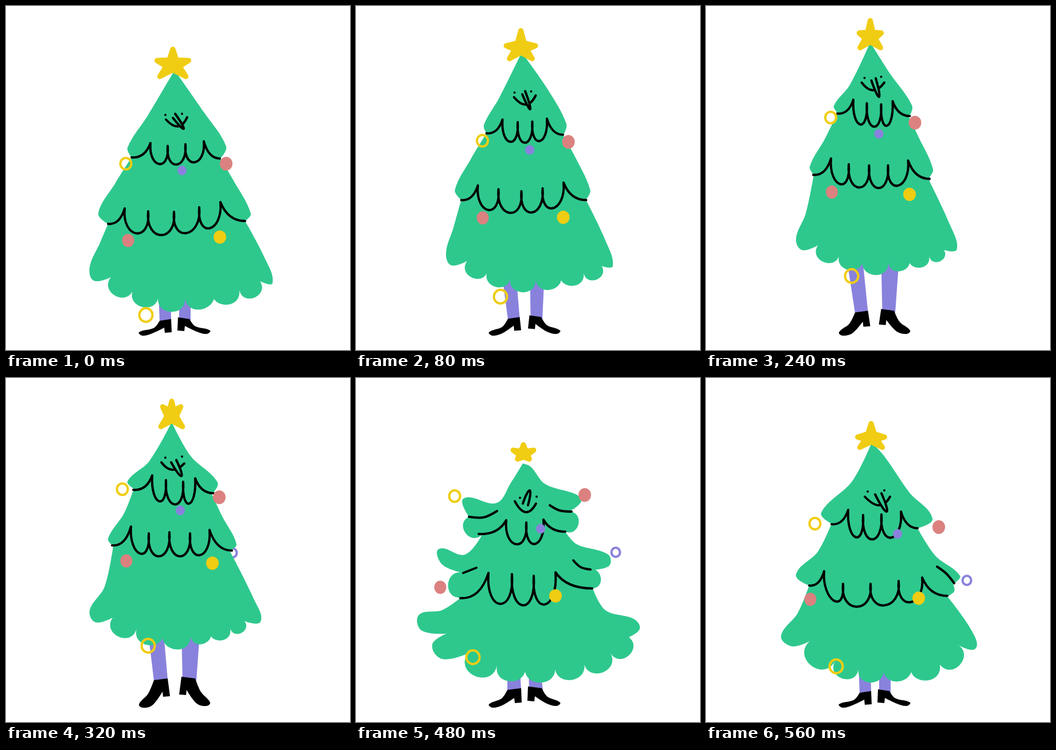
These frames come from a looping animation (600 px wide and 600 px high, 0.64 s). An HTML page with a canvas:

```html
<!DOCTYPE html>
<html lang="en">
<head>
<meta charset="utf-8">
<title>Dancing tree</title>
<style>
  html, body { margin: 0; width: 100%; height: 100%; overflow: hidden; background: #fff; }
  canvas { display: block; width: 600px; height: 600px; }
</style>
</head>
<body>
<canvas id="stage" width="600" height="600"></canvas>
<script>
const GREEN = '#2ec88d', YELLOW = '#f0cd13', RED = '#db8280', PURPLE = '#8982dd', BLACK = '#000';
const STEP = 80, MIDDLE = 295;
const ctx = document.getElementById('stage').getContext('2d');
ctx.lineCap = ctx.lineJoin = 'round';

// outline: smooth parts joined by corners "|"; a part with "~" is a chain of round lobes.
// upper, lower: depth of the loops, then start, cusps and end of a garland.
// star: centre, height, side arm, foot. face: eye, smile, nose.
// legs: hip line and its four edges, ankle, heel.
const stand = {
  outline: `294 112 248 190 212 247 219 264 | 190 310 161 362 178 380 | 164 413 146 455 153 479 183 473
    |~ 222 494 266 506 312 509 360 493 407 496 443 480 | 465 483 450 437 417 375
    | 427 362 396 303 374 266 | 384 245 345 185 294 112`,
  upper: '34 219 264 252 239 282 244 313 241 345 236 373 266',
  lower: '41 178 380 207 353 248 358 293 359 337 351 374 342 417 375',
  star: '291 102 31 32 -8 26 24',
  face: '278 190 279 198 300 210 316 194 291 195 310 214 295 188',
  balls: '209 275 384 275 307 287 213 409 373 403 244 539 405 360',
  legs: '500 266 287 302 322 268 288 548 283 569'
};

const tall = {
  outline: `284 50 252 130 234 168 236 180 | 210 225 184 280 189 296 | 176 360 168 405 178 425 204 417
    |~ 238 429 273 441 314 443 352 436 387 435 414 427 | 431 424 418 376 385 301
    | 390 280 364 215 349 185 | 350 166 320 100 284 50`,
  upper: '39 236 180 259 157 282 161 302 162 321 157 349 183',
  lower: '38 189 297 218 273 249 281 284 287 314 285 350 274 386 302',
  star: '284 42 36 28 2 20 22',
  face: '275 112 272 120 293 134 311 118 289 113 298 146 295 109',
  balls: '232 195 357 199 299 215 229 330 350 334 260 475 368 298',
  legs: '445 244 272 305 335 262 283 541 281 562'
};

const land = {
  outline: `289 77 250 145 212 180 223 193 | 206 236 178 280 187 293 | 172 364 146 405 156 426 186 418
    |~ 228 437 275 442 322 451 355 438 391 437 416 424 | 444 425 433 387 390 301
    | 402 290 378 243 359 203 | 369 182 322 136 289 77`,
  upper: '41 222 195 255 170 279 178 309 181 330 175 362 201',
  lower: '41 185 292 218 259 249 271 285 269 321 271 355 265 394 301',
  star: '289 66 30 19 -19 22 22',
  face: '278 139 271 147 290 160 311 149 288 147 306 171 297 143',
  balls: '203 194 372 208 304 231 210 319 360 323 248 467 395 305',
  legs: '445 248 275 306 338 258 282 526 280 555'
};

const spread = {
  outline: `286 96 268 135 240 180 183 179 180 200 210 213 |~ 223 242 | 208 278 155 306 157 330 188 329
    | 172 367 121 412 126 444 166 433 |~ 213 463 267 487 322 490 371 483 416 475 449 444
    | 482 437 472 415 425 380 399 334 | 425 328 408 303 375 275 358 233 | 388 232 389 214 367 206
    | 392 197 384 178 325 160 299 112 286 96`,
  upper: '49 222 243 258 211 291 214 321 212 364 234',
  lower: '47 183 330 208 308 241 313 278 317 316 316 351 308 393 344',
  star: '283 84 28 20 -15 26 6',
  face: '276 160 269 167 290 180 306 166 288 168 301 151 296 173',
  balls: '164 197 404 197 310 246 183 362 359 361 237 491 438 328',
  legs: '485 261 290 307 330 262 288 536 286 560',
  twigs: '209 214 229 210 245 195 | 340 194 353 201 367 204 | 397 337 390 316 376 301'
};

const squash = {
  outline: `291 149 270 183 245 218 188 210 197 242 |~ 220 273 | 190 308 145 298 150 325 187 340 |~ 183 383
    | 150 405 110 413 114 440 158 446 | 133 465 150 490 194 481
    |~ 246 501 295 502 347 502 397 495 444 480 476 452 | 495 437 484 420 435 405 413 367
    |~ 404 335 | 441 328 440 308 385 290 365 268 |~ 372 233 | 393 215 384 203 330 185 305 155 291 149`,
  upper: '40 214 272 262 248 297 252 327 247 365 268',
  lower: '53 182 384 231 340 272 342 310 345 348 339 412 367',
  star: '292 134 22 22 -10 14 10',
  face: '286 209 277 215 296 234 314 219 291 219 303 196 300 222',
  balls: '172 206 399 204 322 263 147 365 348 380 204 487 453 304',
  legs: '510 264 286 301 322 264 288 543 283 566'
};
squash.twigs = '197 242 223 243 246 232 | 338 222 355 231 376 233 | 187 340 210 331 | 379 318 392 330 409 334';

const rise = {
  outline: `289 113 255 180 201 235 219 254 | 195 303 157 343 180 362 | 160 410 131 450 150 468 181 459
    |~ 225 494 266 508 309 506 357 498 408 500 439 465 | 470 472 463 440 421 381 | 433 372 431 359
    | 443 345 400 310 369 262 | 395 245 355 200 310 135 289 113`,
  upper: '43 219 255 248 230 274 239 306 238 340 233 369 262',
  lower: '40 180 362 206 337 239 359 287 359 336 354 377 348 421 380',
  star: '288 103 28 28 0 23 21',
  face: '282 198 277 207 302 222 321 207 295 203 315 233 306 201',
  balls: '190 254 406 260 334 272 182 386 371 384 227 503 455 353',
  legs: stand.legs,
  twigs: '403 329 419 341 433 358'
};

const BALLS = [
  { color: YELLOW, rx: 9.5, ry: 10, ring: true },
  { color: RED, rx: 11, ry: 12 },
  { color: PURPLE, rx: 8, ry: 8.5 },
  { color: RED, rx: 10.5, ry: 11.5 },
  { color: YELLOW, rx: 11, ry: 11.5 },
  { color: YELLOW, rx: 11.5, ry: 12, ring: true },
  { color: PURPLE, rx: 7.5, ry: 8, ring: true }
];

const numbers = text => (text.match(/-?[\d.]+/g) || []).map(Number);
const pairs = list => list.flatMap((n, i) => i % 2 ? [] : [[n, list[i + 1]]]);

function halfway(a, b) {
  const mix = key => {
    const other = numbers(b[key]);
    let i = 0;
    return a[key].replace(/-?[\d.]+/g, n => (Number(n) + other[i++]) / 2);
  };
  return Object.fromEntries(Object.keys(a).map(key => [key, mix(key)]));
}

// Smooth curve through the points, with handles in proportion to each span.
function smooth(path, pts) {
  const handle = (i, span) => {
    const a = pts[i - 1], b = pts[i + 1];
    if (!a || !b) return [0, 0];
    const k = span / 3 / Math.hypot(b[0] - a[0], b[1] - a[1]);
    return [(b[0] - a[0]) * k, (b[1] - a[1]) * k];
  };
  for (let i = 0; i < pts.length - 1; i++) {
    const p = pts[i], q = pts[i + 1], span = Math.hypot(q[0] - p[0], q[1] - p[1]);
    const u = handle(i, span), v = handle(i + 1, span);
    path.bezierCurveTo(p[0] + u[0], p[1] + u[1], q[0] - v[0], q[1] - v[1], ...q);
  }
}

// Round lobe from p to q, pushed out by (x, y).
function lobe(path, p, q, x, y) {
  const fx = (q[0] - p[0]) * 0.13, fy = (q[1] - p[1]) * 0.13;
  path.bezierCurveTo(p[0] - fx + x, p[1] - fy + y, q[0] + fx + x, q[1] + fy + y, ...q);
}

function outlinePath(text) {
  const path = new Path2D();
  let last = null;
  for (const part of text.split('|')) {
    const pts = pairs(numbers(part));
    if (last) pts.unshift(last);
    else path.moveTo(...pts[0]);
    if (part.startsWith('~')) {
      pts.slice(1).forEach((q, i) => {
        const p = pts[i];
        lobe(path, p, q, (p[1] - q[1]) * 0.75, (q[0] - p[0]) * 0.75);
      });
    } else smooth(path, pts);
    last = pts[pts.length - 1];
  }
  return path;
}

function garlandPath(text) {
  const [depth, ...rest] = numbers(text);
  const pts = pairs(rest), end = pts.length - 1, path = new Path2D();
  path.moveTo(...pts[0]);
  for (let i = 1; i <= end; i++) {
    const p = pts[i - 1], q = pts[i];
    if (i === 1) path.quadraticCurveTo(q[0] * 0.7 + p[0] * 0.3, p[1] + 2, ...q);
    else if (i === end) path.quadraticCurveTo(p[0] * 0.7 + q[0] * 0.3, q[1], ...q);
    else lobe(path, p, q, 0, depth * 4 / 3);
  }
  return path;
}

function fill(path, color) {
  ctx.fillStyle = color;
  ctx.fill(path);
}

function stroke(path, width, color = BLACK) {
  ctx.strokeStyle = color;
  ctx.lineWidth = width;
  ctx.stroke(path);
}

function polygon(pts) {
  const path = new Path2D();
  pts.forEach(p => path.lineTo(...p));
  path.closePath();
  return path;
}

function drawLegs(text) {
  const [hip, a, b, c, d, left, right, ankle, heelX, heelY] = numbers(text);
  const flip = x => 2 * MIDDLE - x;
  fill(polygon([[a, hip], [left, ankle + 2], [right, ankle], [b, hip]]), PURPLE);
  fill(polygon([[c, hip], [flip(right), ankle], [flip(left), ankle + 2], [d, hip]]), PURPLE);
  const boot = new Path2D(), top = [left, ankle + 1];
  boot.moveTo(...top);
  boot.lineTo(right, ankle - 2);
  boot.lineTo(heelX + 6, heelY);
  boot.lineTo(heelX - 6, heelY + 1);
  const arch = [heelX - 7, heelY - 8];
  boot.lineTo(...arch);
  smooth(boot, [arch, [255, 571], [238, 575], [232, 569], [left - 10, (ankle + 575) / 2], top]);
  fill(boot, BLACK);
  ctx.save();
  ctx.translate(2 * MIDDLE - 2, -3);
  ctx.scale(-1, 1);
  fill(boot, BLACK);
  ctx.restore();
}

function drawStar(text) {
  const [x, y, height, sideX, sideY, footX, footY] = numbers(text);
  const tips = [[0, -height], [sideX, sideY], [footX, footY], [-footX, footY], [-sideX, sideY]];
  const at = (p, k) => [x + p[0] * k, y + p[1] * k];
  const star = polygon(tips.flatMap((p, i) => {
    const q = tips[(i + 1) % tips.length];
    const inset = 1 - 4.5 / Math.hypot(...p);
    return [at(p, inset), at([p[0] + q[0], p[1] + q[1]], 0.2)];
  }));
  fill(star, YELLOW);
  stroke(star, 9, YELLOW);
}

function drawFace(text) {
  const [eye, a, m, b, from, tip, to] = pairs(numbers(text));
  const dots = new Path2D(), smile = new Path2D(), nose = new Path2D();
  for (const [dx, dy] of [[0, 0], [29, -2]]) {
    dots.moveTo(eye[0] + dx, eye[1] + dy);
    dots.lineTo(eye[0] + dx, eye[1] + dy);
  }
  smile.moveTo(...a);
  smile.quadraticCurveTo(...m.map((v, i) => 2 * v - (a[i] + b[i]) / 2), ...b);
  const pull = side => tip.map((v, i) => (v - (from[i] + to[i]) / 8) / 0.75 + side * (to[i] - from[i]) * 0.4);
  nose.moveTo(...from);
  nose.bezierCurveTo(...pull(-1), ...pull(1), ...to);
  stroke(dots, 4);
  stroke(smile, 4);
  fill(nose, GREEN);
  stroke(nose, 4);
}

function drawBall([x, y], { color, rx, ry, ring }) {
  const path = new Path2D();
  path.ellipse(x, y, rx, ry, 0, 0, Math.PI * 2);
  if (ring) stroke(path, 4, color);
  else fill(path, color);
}

function draw(pose) {
  const spots = pairs(numbers(pose.balls));
  ctx.fillStyle = '#fff';
  ctx.fillRect(0, 0, 600, 600);
  drawLegs(pose.legs);
  drawBall(spots[6], BALLS[6]);
  fill(outlinePath(pose.outline), GREEN);
  stroke(garlandPath(pose.upper), 4);
  stroke(garlandPath(pose.lower), 4);
  for (const twig of (pose.twigs || '').split('|')) {
    if (twig) stroke(outlinePath(twig), 4);
  }
  drawStar(pose.star);
  drawFace(pose.face);
  for (let i = 0; i < 6; i++) drawBall(spots[i], BALLS[i]);
}

const poses = [stand, halfway(stand, tall), tall, halfway(tall, land), land, spread, squash, rise];
let shown = -1;

function tick() {
  const index = Math.floor(performance.now() / STEP) % poses.length;
  if (index !== shown) draw(poses[shown = index]);
  requestAnimationFrame(tick);
}
tick();
</script>
</body>
</html>
```
